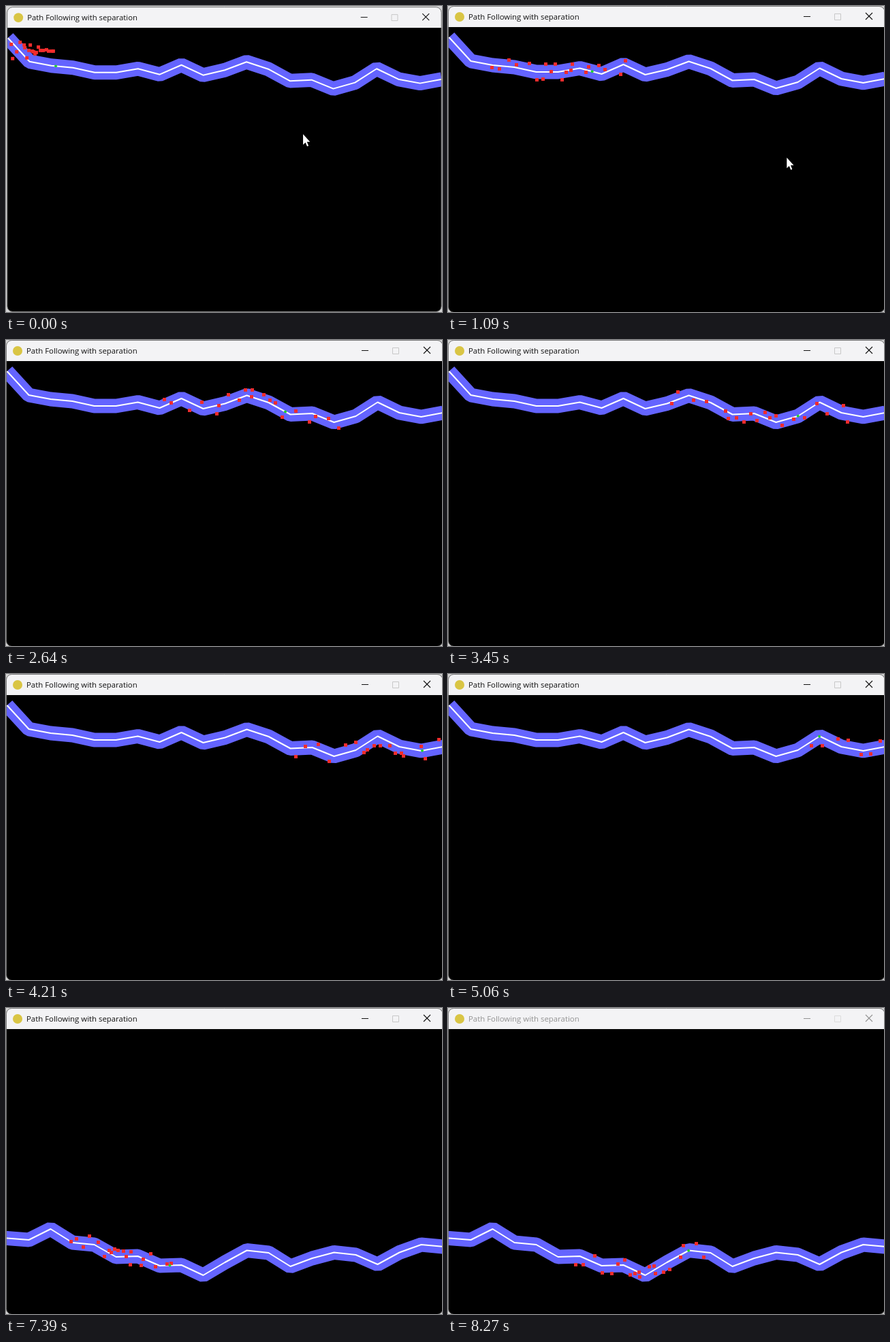
An HTML page with a canvas for the animation above (8.3 s loop, 640 px wide and 450 px high).

```html
<!DOCTYPE html>
<html lang="en">
<head>
<meta charset="utf-8">
<title>Path Following with separation</title>
<style>
html, body { margin: 0; width: 100%; height: 100%; overflow: hidden; background: #d4d4d4; }
canvas { display: block; }
</style>
</head>
<body>
<canvas id="stage" width="640" height="450"></canvas>
<script>
const ctx = document.getElementById('stage').getContext('2d');
const LOOP = 8300, RESET = 5960, SPEED = 0.128;
const COUNT = 20, STEP = 32, LEFT = 1.5;

// Each run: path heights every 32 px, and [time, tail x, head x] of the swarm
const upper = {
  path: [46, 81, 87, 90, 97, 97, 91.5, 100, 86, 101, 93.5, 81.5, 92, 109.5, 108, 121, 112, 91.5, 107, 113, 107],
  keys: [[0, 6, 69], [1090, 64, 260], [1850, 138, 390], [3450, 328, 590], [RESET, 648, 910]]
};
const lower = {
  path: [338.5, 341, 325, 345, 348, 366, 365, 379, 378, 393, 374, 356.5, 360, 380, 368, 359.5, 363, 377, 359.5, 348, 351],
  keys: [[RESET, 0, 40], [6520, 3, 110], [LOOP, 190, 379]]
};

const mix = (a, b, u) => a + (b - a) * u;
const clamp = u => Math.max(0, Math.min(1, u));

function random(i, salt) {
  const s = Math.sin(i * 12.9898 + salt * 78.233) * 43758.5453;
  return s - Math.floor(s);
}

function heightAt(path, x) {
  const p = Math.max(0, Math.min(path.length - 1.001, (x - LEFT) / STEP));
  const i = Math.floor(p);
  return mix(path[i], path[i + 1], p - i);
}

function extent(keys, t) {
  let i = 0;
  while (i < keys.length - 2 && t >= keys[i + 1][0]) i++;
  const [a, b] = [keys[i], keys[i + 1]];
  const u = (t - a[0]) / (b[0] - a[0]);
  return [mix(a[1], b[1], u), mix(a[2], b[2], u)];
}

// Agents keep a loose order along the path and weave across it
function agent(i, t, { path, keys }) {
  const [tail, head] = extent(keys, t);
  const phase = random(i, 1) * 2 * Math.PI;
  const even = (i + 0.8 * (random(i, 2) - 0.5)) / (COUNT - 1);
  const rank = clamp(even + 0.06 * Math.sin(2 * Math.PI * even) + 0.015 * Math.sin(t / 500 + phase));
  const x = mix(tail, head, rank);
  const lane = 12 * Math.sin(phase + t * mix(0.001, 0.003, random(i, 3)));
  const huddle = 65 + 34 * (random(i, 4) - 0.5) * (1 - rank);
  return [x, mix(huddle, heightAt(path, x) + lane, clamp(t / 700))];
}

// The marker leads one agent, then the last one left, then the next swarm
function markerX(t) {
  if (t < 4430) return 72 + SPEED * t;
  return t < RESET ? 545 + SPEED * (t - 5060) : 129 + SPEED * (t - 6520);
}

function stroke(color, width, points) {
  ctx.strokeStyle = color;
  ctx.lineWidth = width;
  ctx.beginPath();
  points.forEach(([x, y]) => ctx.lineTo(x, y));
  ctx.stroke();
}

function disc(x, y, r, color) {
  ctx.fillStyle = color;
  ctx.beginPath();
  ctx.arc(x, y, r, 0, 7);
  ctx.fill();
}

function titleBar(active) {
  ctx.fillStyle = '#f3f3f5';
  ctx.fillRect(0, 0, 641, 31);
  disc(17, 16, 7, '#d9c544');
  ctx.fillStyle = active ? '#111' : '#929292';
  ctx.font = '11.4px "Open Sans", "Noto Sans", sans-serif';
  ctx.fillText('Path Following with separation', 30, 20);
  const ink = active ? '#111' : '#929292';
  stroke(ink, 1, [[522, 15.5], [532, 15.5]]);
  ctx.strokeStyle = active ? '#c8c8c8' : '#dcdcdc';
  ctx.strokeRect(567.5, 11.5, 9, 9);
  stroke(ink, 1.1, [[613, 10], [623, 20]]);
  stroke(ink, 1.1, [[623, 10], [613, 20]]);
}

function pointer(t) {
  if (t > 1430) return;
  const glide = clamp(t / 1090), leave = clamp((t - 1090) / 300);
  const x = mix(436, 497, glide) + 89 * leave;
  const y = mix(188.5, 223, glide) + 17 * leave;
  const shape = [[0, 0], [0, 15.5], [3.5, 12.3], [6, 18], [8, 17], [5.7, 11.3], [10.2, 11.3]];
  ctx.fillStyle = '#fff';
  ctx.beginPath();
  shape.forEach(([dx, dy]) => ctx.lineTo(x + dx, y + dy));
  ctx.fill();
}

function draw(t) {
  const run = t < RESET ? upper : lower;
  ctx.setTransform(1, 0, 0, 1, 0, 0);
  ctx.fillStyle = '#d4d4d4';
  ctx.fillRect(0, 0, 640, 450);

  // The window finishes growing as it opens
  const grow = clamp(1 - t / 60);
  const scale = 1 - 0.005 * grow;
  ctx.setTransform(scale, 0, 0, scale, 1.3 * grow, 1.2 * grow);

  const frame = new Path2D();
  frame.roundRect(0.5, 0.5, 640.5, 450, 8);
  ctx.save();
  ctx.clip(frame);
  ctx.fillStyle = '#000';
  ctx.fillRect(0, 0, 642, 452);

  ctx.lineJoin = 'bevel';
  const points = run.path.map((y, i) => [LEFT + i * STEP, y]);
  if (run === lower) points.unshift([-8, 338]);
  stroke('#6464ff', 21, points);
  stroke('#fff', 2, points);

  ctx.fillStyle = '#f22c2c';
  for (let i = 0; i < COUNT; i++) {
    const [x, y] = agent(i, t, run);
    ctx.fillRect(Math.round(x) - 2, Math.round(y) - 2, 5, 5);
  }
  const x = markerX(t);
  disc(x, heightAt(run.path, x), 2, '#1fd32f');

  titleBar(t < 8200);
  ctx.restore();

  ctx.strokeStyle = '#7a7a7a';
  ctx.lineWidth = 1;
  ctx.stroke(frame);

  ctx.setTransform(1, 0, 0, 1, 0, 0);
  pointer(t);
}

const begin = performance.now();
function tick() {
  draw((performance.now() - begin) % LOOP);
  requestAnimationFrame(tick);
}
tick();
</script>
</body>
</html>
```
